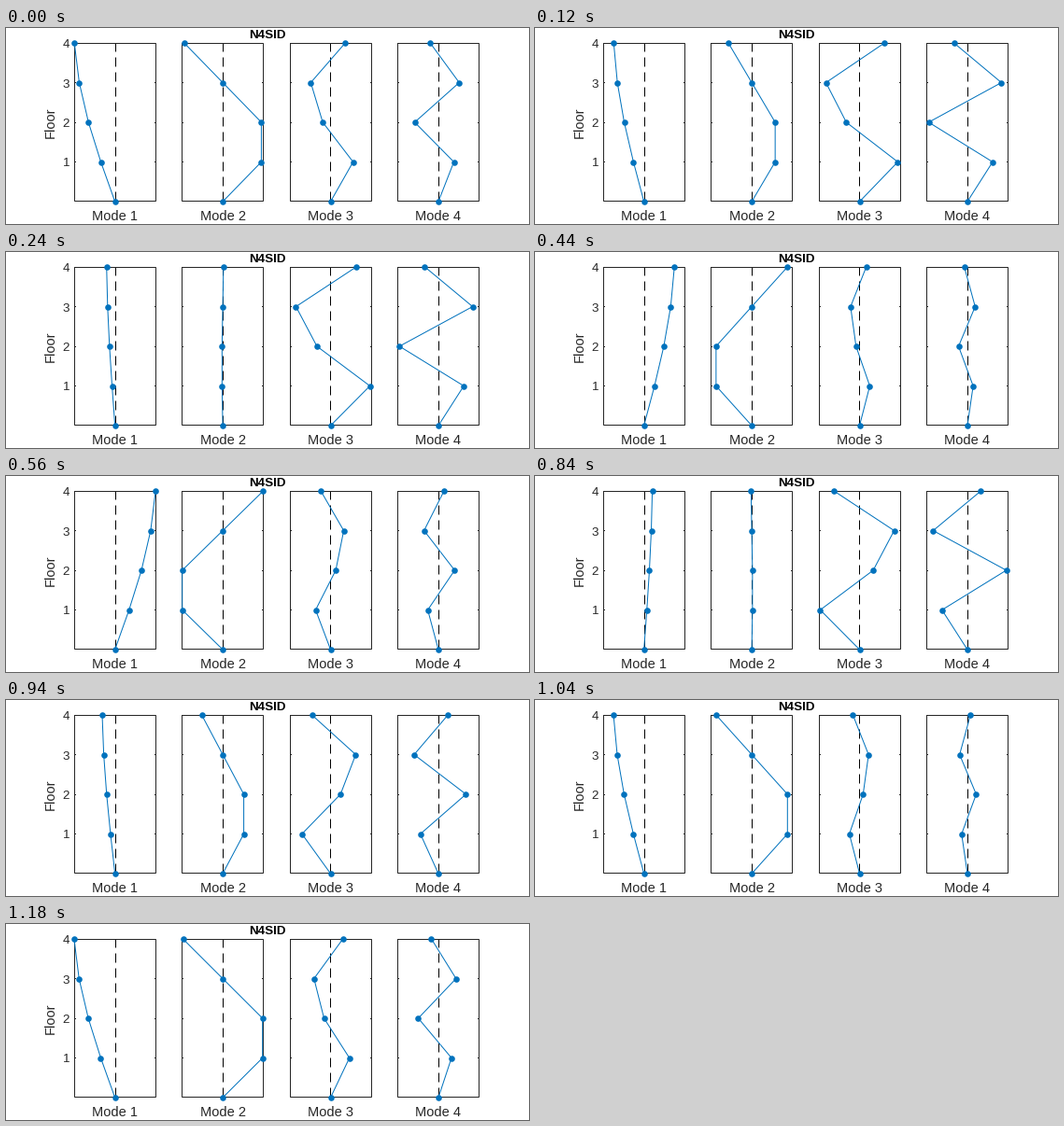
These frames come from a looping animation (560x210 px, 1.2 s). A matplotlib script:

```python
import numpy as np
import matplotlib.pyplot as plt
from matplotlib.animation import FuncAnimation

W, H, DPI = 560, 210, 100
FRAMES, INTERVAL = 60, 20
PX = 72 / DPI  # points per pixel

BLUE, GREY = "#0072BD", "#262626"
TOP, BOTTOM = 16, 186
HALF = 43.7
FLOORS = np.arange(5)
FLOOR_Y = BOTTOM - (BOTTOM - TOP) / 4 * FLOORS
CENTERS = 116.65 + 115.44 * np.arange(4)
PHASES = np.radians([173.8, -19, 56.5, 54.5])

plt.rcParams["font.family"] = "Liberation Sans"
fig = plt.figure(figsize=(W / DPI, H / DPI), dpi=DPI, facecolor="white")
ax = fig.add_axes([0, 0, 1, 1])
ax.set_xlim(0, W)
ax.set_ylim(H, 0)
ax.axis("off")


def mode_shape(mode):
    """Shape of a uniform four-storey shear frame, largest sway 1."""
    shape = np.sin((2 * mode - 1) * FLOORS * np.pi / 9)
    return shape / np.abs(shape).max()


def line(xs, ys, color=GREY, **style):
    return ax.plot(xs, ys, color=color, lw=PX, clip_on=False, **style)[0]


def label(x, y, text, size, color=GREY, ha="center", **style):
    ax.text(x, y, text, fontsize=size * PX, color=color, ha=ha,
            va="baseline", **style)


def draw_panel(center, name):
    left = round(center - HALF)
    right, bottom = left + 87, BOTTOM - 1
    mid = int(center + 0.4)
    line([mid, mid], [bottom, TOP], "black", dashes=(10, 6),
         dash_capstyle="butt")
    line([left, right, right, left, left], [TOP, TOP, bottom, bottom, TOP],
         solid_joinstyle="miter")
    for y in FLOOR_Y[1:4].astype(int):
        line([left, left + 1], [y, y])
        line([right - 1, right], [y, y])
    label(center, 206, name, 14.67)
    return line([], [], BLUE, marker="o", ms=6.6 * PX, mew=0, zorder=5)


curves = [draw_panel(c, f"Mode {i}") for i, c in enumerate(CENTERS, 1)]
shapes = [HALF * mode_shape(i) for i in range(1, 5)]

for floor in FLOORS[1:]:
    label(68, FLOOR_Y[floor] + 5, str(floor), 13.33, ha="right")
label(51.5, 101, "Floor", 14.67, rotation=90, rotation_mode="anchor")
label(280, 11, "N4SID", 13.33, "black", weight="bold")


def update(frame):
    angle = 2 * np.pi * frame / FRAMES
    for curve, center, shape, phase in zip(curves, CENTERS, shapes, PHASES):
        curve.set_data(center + shape * np.cos(angle - phase), FLOOR_Y)
    return curves


anim = FuncAnimation(fig, update, frames=FRAMES, interval=INTERVAL,
                     repeat=True, repeat_delay=0, blit=False)
plt.show()
```
